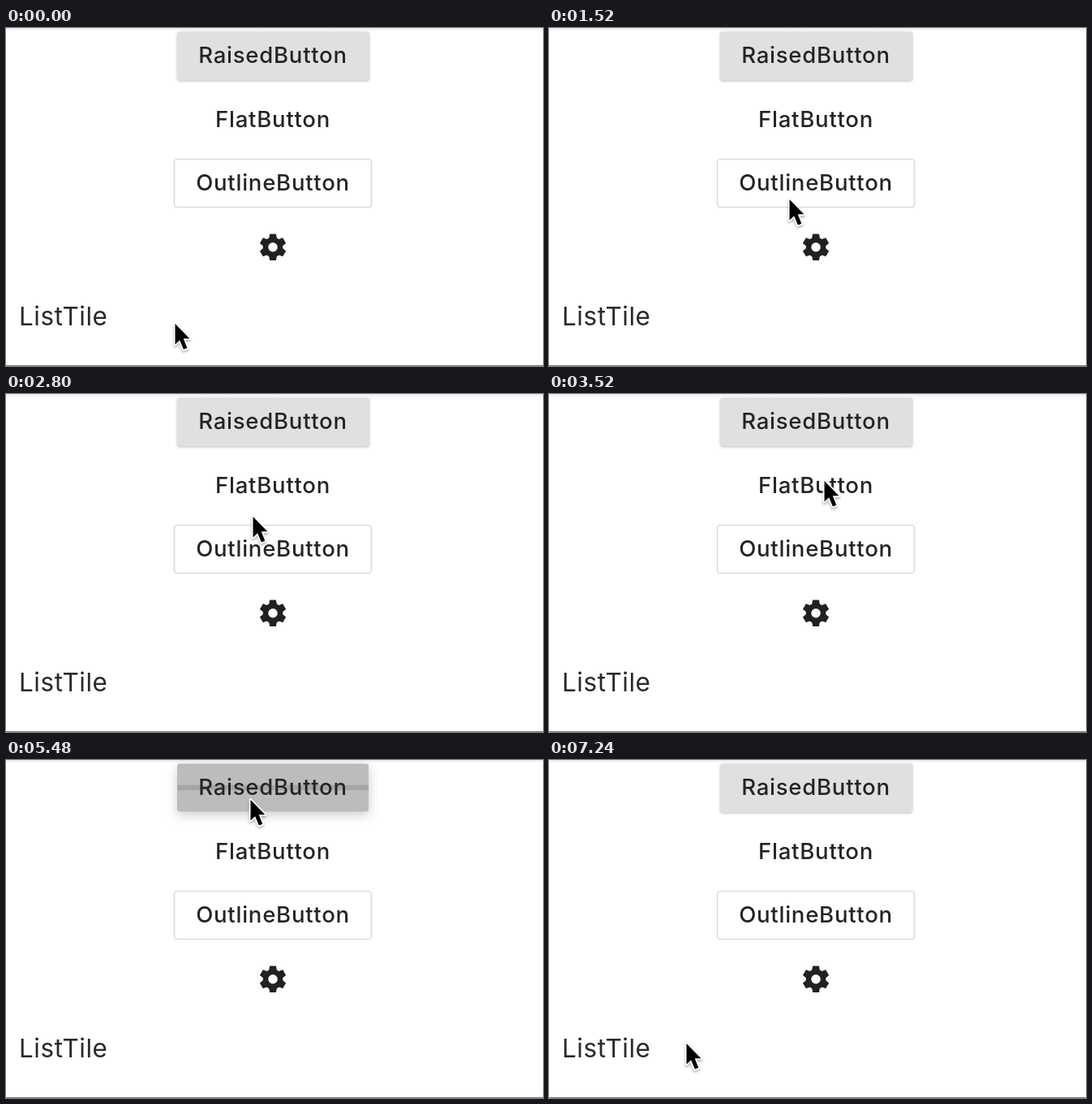
An HTML page that plays this animation: 662 px wide and 416 px high, repeating every 7.88 s.

```html
<!DOCTYPE html>
<html lang="en">
<head>
<meta charset="utf-8">
<style>
  html, body { margin: 0; width: 100%; height: 100%; overflow: hidden; background: #fff; }
  svg { display: block; }
  text { font: 500 27.5px Inter, Roboto, sans-serif; letter-spacing: .77px; fill: #242424; }
  .button { text-anchor: middle; }
  .tile { font-size: 31.5px; font-weight: 400; letter-spacing: .52px; fill: #2a2a2a; }
  .shadow { fill: #e0e0e0; }
  #low { filter: drop-shadow(0 1px 1.5px rgba(0,0,0,.25)); }
  #high { filter: drop-shadow(0 4px 7px rgba(0,0,0,.2)); }
  #cursor { filter: drop-shadow(0 2px 1.5px rgba(0,0,0,.3)); }
</style>
</head>
<body>
<svg width="662" height="416" viewBox="0 0 662 416">
  <defs>
    <linearGradient id="bar" x2="0" y2="1">
      <stop stop-color="#e9e9e9"/><stop offset="1" stop-color="#fff"/>
    </linearGradient>
    <path id="tooth" d="M-2.1-9.6H2.1L2.7-6H-2.7Z" stroke="#212121" stroke-width=".7" stroke-linejoin="round"/>
  </defs>
  <rect width="662" height="4" fill="url(#bar)"/>
  <rect class="shadow" id="low" x="211" y="4.5" width="237" height="60" rx="3"/>
  <rect class="shadow" id="high" x="211" y="4.5" width="236" height="59" rx="3"/>
  <rect x="207.5" y="161.5" width="243" height="59" rx="3.5" fill="none" stroke="#dcdcdc" stroke-width="1.7"/>
  <g id="ink"></g>
  <text class="button" x="329" y="43">RaisedButton</text>
  <text class="button" x="329" y="121.5">FlatButton</text>
  <text class="button" x="329" y="200">OutlineButton</text>
  <text class="tile" x="16" y="366.3">ListTile</text>
  <g id="gear" transform="translate(329 269.7) scale(1.64)" fill="#212121">
    <circle r="5.5" fill="none" stroke="#212121" stroke-width="4"/>
  </g>
  <rect y="415" width="662" height="1" fill="#777"/>
  <path id="cursor" d="M0 0V25.5L5.6 20.2L10.4 31.6L14.8 29.7L10.2 18.2H17.8Z"
        stroke="#fff" stroke-width="3.6" paint-order="stroke" stroke-linejoin="round"/>
</svg>
<script>
const LOOP = 7880, STEP = 40;
const $ = id => document.getElementById(id);
const clamp = v => Math.max(0, Math.min(1, v));

function add(parent, tag, attributes) {
  const node = document.createElementNS('http://www.w3.org/2000/svg', tag);
  for (const key in attributes) node.setAttribute(key, attributes[key]);
  return parent.appendChild(node);
}

for (let angle = 0; angle < 360; angle += 60)
  add($('gear'), 'use', { href: '#tooth', transform: `rotate(${angle})` });

// Each press fills the control and draws a line through it from the left.
const presses = [
  { x: 0, y: 309, w: 662, h: 92, down: 400, up: 1150, fill: 0, line: .1, reach: .75 },
  { x: 207, y: 161, w: 244, h: 60, down: 1890, up: 2470, fill: .16, line: .12, reach: 1 },
  { x: 231.5, y: 82.5, w: 195, h: 59, down: 3810, up: 4270, fill: .16, line: .12, reach: 1 },
  { x: 211, y: 4.5, w: 236, h: 59, down: 5250, up: 5870, fill: .16, line: .12, reach: 1 },
].map(p => {
  p.fillNode = add($('ink'), 'rect', { x: p.x, y: p.y, width: p.w, height: p.h, rx: 3 });
  p.lineNode = add($('ink'), 'rect', {
    x: p.x, y: p.y + p.h / 2 - 3.3, height: 6.6, rx: 1.5, 'fill-opacity': p.line });
  return p;
});

// time, x, y of the pointer tip
const path = [
  [1260, 208.5, 364], [1520, 296.5, 211], [1680, 304.5, 188],
  [2600, 304.5, 188], [2800, 304.5, 151], [2920, 306.5, 113], [3040, 309.5, 138],
  [3340, 309.5, 138], [3520, 339.5, 107],
  [4480, 339.5, 107], [4960, 301.5, 49],
  [5880, 301.5, 49], [6080, 308.5, 79],
  [6420, 308.5, 79], [6640, 171.5, 318], [6880, 143.5, 380],
  [7060, 143.5, 380], [7240, 169.5, 349],
];

function pointerAt(t) {
  const next = path.findIndex(key => key[0] > t);
  if (next < 0) return path[path.length - 1].slice(1);
  const b = path[next], a = path[next - 1] || b;
  const k = a === b ? 0 : (t - a[0]) / (b[0] - a[0]);
  return [1, 2].map(i => a[i] + (b[i] - a[i]) * k);
}

function draw(now) {
  const t = Math.floor(now % LOOP / STEP) * STEP;
  let level = 0;
  for (const p of presses) {
    const release = clamp(1 - (t - p.up) / 180);
    const grown = clamp((t - p.down) / 200);
    level = grown * release;
    p.fillNode.setAttribute('fill-opacity', p.fill * level);
    p.lineNode.setAttribute('width', p.w * Math.min(p.reach, grown) * release);
  }
  // The raised button comes last, so level now holds its elevation.
  $('low').style.opacity = 1 - level;
  $('high').style.opacity = level;
  $('cursor').setAttribute('transform', `translate(${pointerAt(t)})`);
}

const start = performance.now();
(function frame() {
  draw(performance.now() - start);
  requestAnimationFrame(frame);
})();
</script>
</body>
</html>
```
